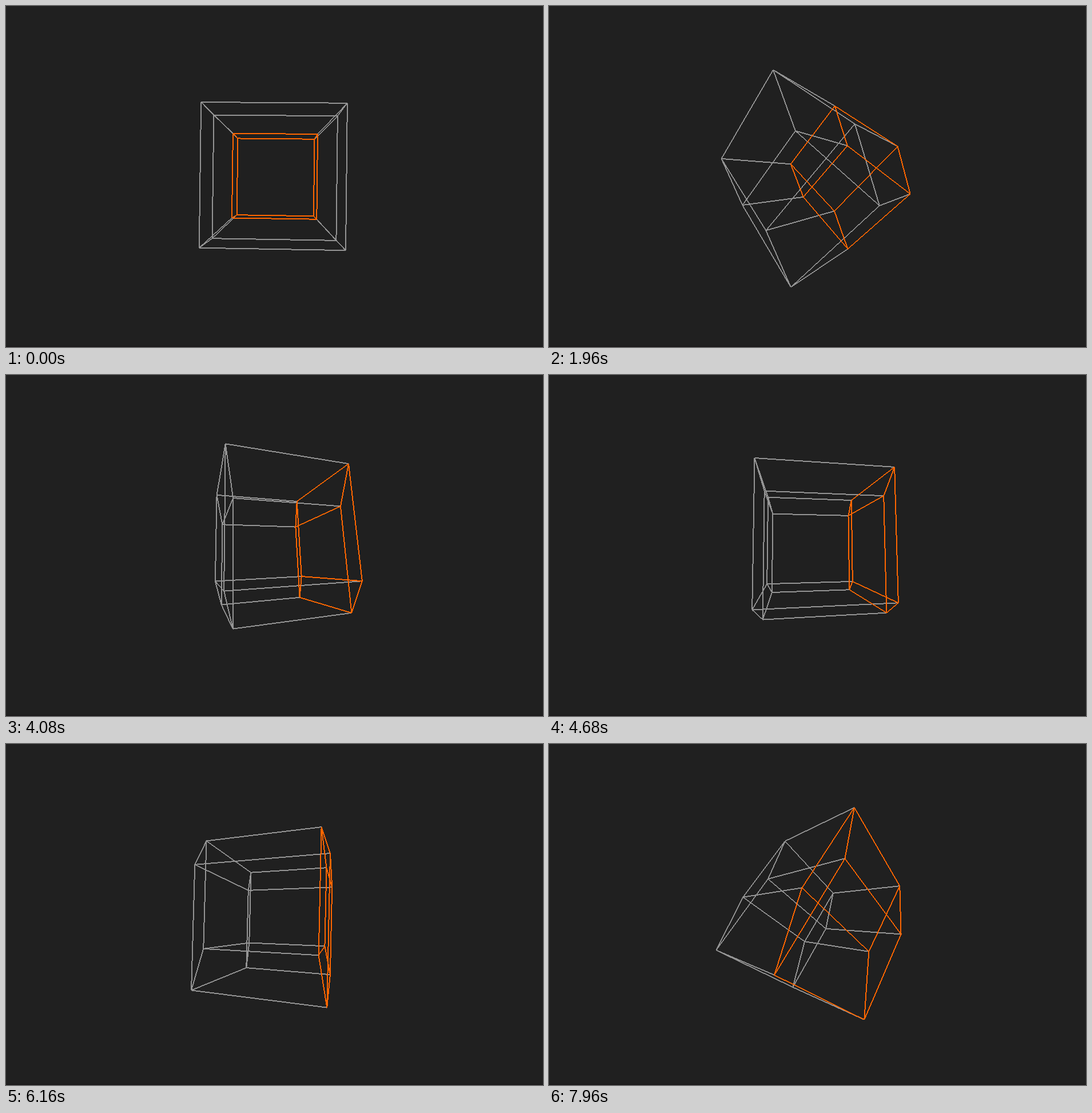
An HTML page with a canvas that plays this animation: 939 by 596 pixels, repeating every 8000 ms.

```html
<!DOCTYPE html>
<html lang="en">
<head>
<meta charset="utf-8">
<title>Tesseract</title>
<style>
  html, body { margin: 0; width: 100%; height: 100%; overflow: hidden; background: #202020; }
  canvas { display: block; }
</style>
</head>
<body>
<canvas id="stage" width="939" height="596"></canvas>
<script>
const ctx = document.getElementById("stage").getContext("2d");
const W = 939, H = 596;
const CX = 469.8, CY = 298.3;
const LOOP = 8000, TICK = 40;
const SPEED = 0.3, START = 0.012; // radians per second, radians
const SCALE = 1.5 * W, EYE = 4;
const GREY = "#949494", ORANGE = "#ff6600";
const HOT = 8; // bit of the axis whose positive cell is highlighted

const dot = (a, b) => a[0] * b[0] + a[1] * b[1] + a[2] * b[2];

// Each vertex is a 4-bit number, each edge flips one bit.
const edges = [];
for (let v = 0; v < 16; v++) {
  for (let bit = 1; bit < 16; bit *= 2) {
    if (!(v & bit)) edges.push([v, v | bit]);
  }
}
const isHot = ([a, b]) => (a & b & HOT) !== 0;
const greyEdges = edges.filter(e => !isHot(e));
const hotEdges = edges.filter(isHot);

function project(angle) {
  const s = Math.sin(angle), c = Math.cos(angle);
  // Turn in space about a moving axis, then in the x-w plane.
  const skew = -s * c * (1 - s);
  const rowX = [s + s * s * (1 - s), c * c, skew];
  const rowY = [-c * c, s, -s * c];
  const rowZ = [skew, s * c, s + c * c * (1 - s)];
  const points = [];
  for (let v = 0; v < 16; v++) {
    const sign = bit => (v & bit ? 1 : -1);
    const p = [sign(1), sign(2), sign(4)], o = sign(HOT);
    const nx = dot(rowX, p);
    const x = s * o + c * nx;
    const w = s * nx - c * o;
    const depth = EYE * (EYE - w) - dot(rowZ, p);
    points.push([CX + SCALE * x / depth, CY + SCALE * dot(rowY, p) / depth]);
  }
  return points;
}

// Hard-edged line, two pixels thick across its longer direction.
function line(a, b) {
  const steep = Math.abs(b[1] - a[1]) > Math.abs(b[0] - a[0]);
  const major = steep ? 1 : 0, minor = 1 - major;
  if (a[major] > b[major]) [a, b] = [b, a];
  const slope = (b[minor] - a[minor]) / (b[major] - a[major] || 1);
  const rowAt = i => Math.round(a[minor] + (i + 0.5 - a[major]) * slope) - 1;
  const end = Math.round(b[major]);
  let from = Math.round(a[major]);
  while (from < end) {
    const row = rowAt(from);
    let to = from + 1;
    while (to < end && rowAt(to) === row) to++;
    if (steep) ctx.fillRect(row, from, 2, to - from);
    else ctx.fillRect(from, row, to - from, 2);
    from = to;
  }
}

function drawEdges(list, points, color) {
  ctx.fillStyle = color;
  for (const [a, b] of list) line(points[a], points[b]);
}

function draw(ms) {
  ctx.fillStyle = "#202020";
  ctx.fillRect(0, 0, W, H);
  ctx.fillStyle = "#1b191a";
  ctx.fillRect(0, H - 2, W, 2);
  const points = project(START + SPEED * ms / 1000);
  drawEdges(greyEdges, points, GREY);
  drawEdges(hotEdges, points, ORANGE);
}

const begin = performance.now();
function frame() {
  const ms = (performance.now() - begin) % LOOP;
  draw(Math.floor(ms / TICK) * TICK);
  requestAnimationFrame(frame);
}
frame();
</script>
</body>
</html>
```
